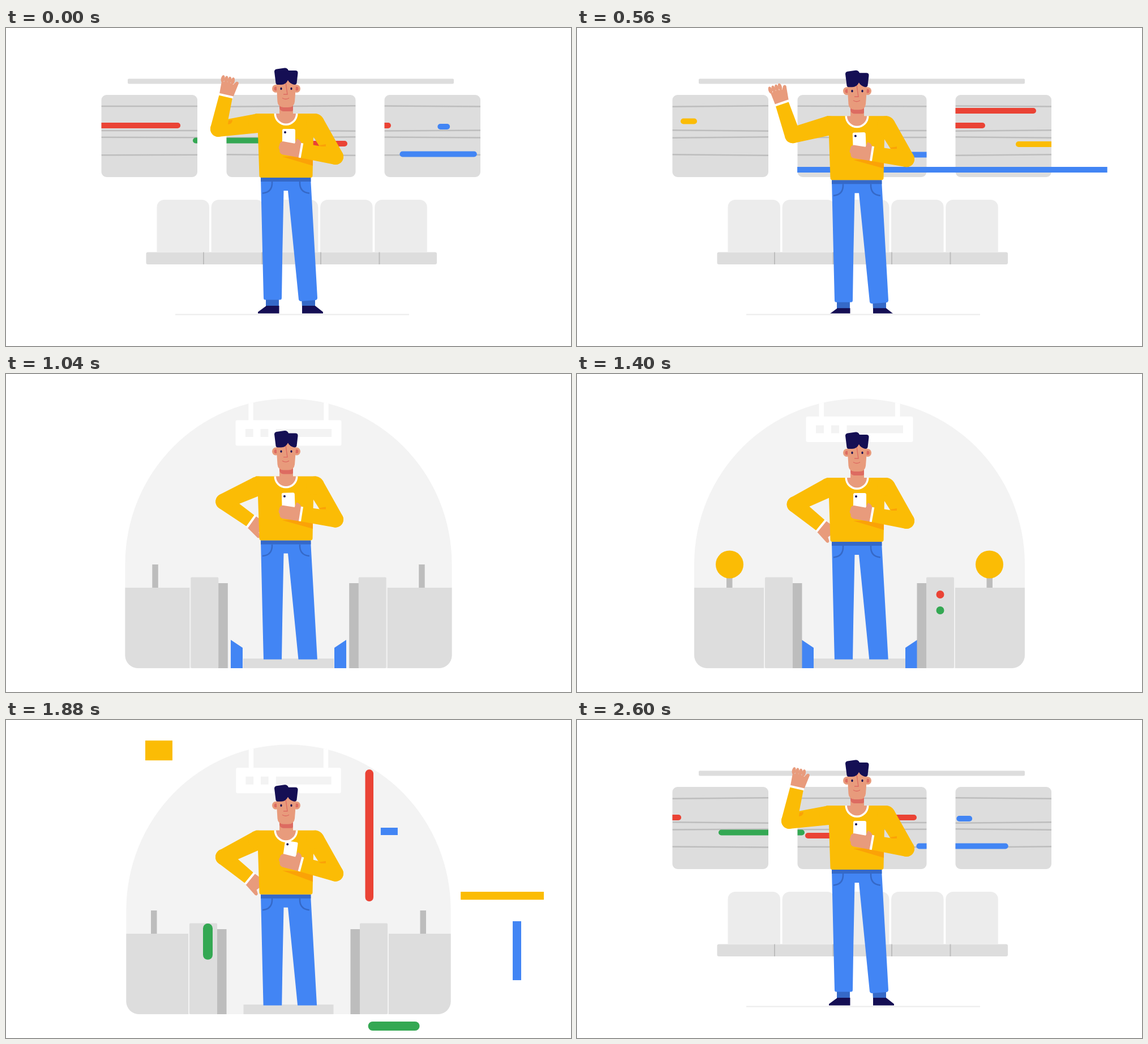
Animation of 998 by 561 pixels, one loop 2640 ms. Source, as an HTML page with a canvas:

```html
<!DOCTYPE html>
<html lang="en">
<head>
<meta charset="utf-8">
<title>Commuter</title>
<style>
html, body { margin: 0; width: 100%; height: 100%; overflow: hidden; background: #fff; }
canvas { display: block; }
</style>
</head>
<body>
<canvas id="stage" width="998" height="561"></canvas>
<script>
const ctx = document.getElementById('stage').getContext('2d');
const LOOP = 2640;
const C = {
  red: '#ea4335', green: '#34a853', blue: '#4285f4', yellow: '#fbbc05', orange: '#fba207',
  denim: '#3569c8', navy: '#150f54', skin: '#e89b7c', blush: '#dd6b61',
  grey: '#ddd', dark: '#bdbdbd', seat: '#ececec', pale: '#f3f3f3', white: '#fff'
};

const clamp = v => Math.max(0, Math.min(1, v));
const ramp = (t, a, b) => clamp((t - a) / (b - a));

// Smooth curve through keys [time, ...values]; flat at extremes.
function track(keys, t, i = 1) {
  const n = keys.length - 1;
  if (t <= keys[0][0]) return keys[0][i];
  if (t >= keys[n][0]) return keys[n][i];
  let k = 0;
  while (t >= keys[k + 1][0]) k++;
  const slope = j => (keys[j + 1][i] - keys[j][i]) / (keys[j + 1][0] - keys[j][0]);
  const tangent = j => j < 1 || j >= n || slope(j - 1) * slope(j) <= 0 ? 0
    : (keys[j + 1][i] - keys[j - 1][i]) / (keys[j + 1][0] - keys[j - 1][0]);
  const a = keys[k], b = keys[k + 1], d = b[0] - a[0], u = (t - a[0]) / d, v = 1 - u;
  return a[i] * v * v * (1 + 2 * u) + b[i] * u * u * (3 - 2 * u)
    + d * u * v * (v * tangent(k) - u * tangent(k + 1));
}

function rect(color, x, y, w, h, r = 0) {
  if (w <= 0 || h <= 0) return;
  ctx.fillStyle = color;
  ctx.beginPath();
  ctx.roundRect(x, y, w, h, r);
  ctx.fill();
}
function circle(color, x, y, r, ry = r) {
  ctx.fillStyle = color;
  ctx.beginPath();
  ctx.ellipse(x, y, Math.max(0, r), Math.max(0, ry), 0, 0, 7);
  ctx.fill();
}
function shape(color, path) {
  ctx.fillStyle = color;
  ctx.fill(new Path2D(path));
}
function line(color, width, path) {
  ctx.strokeStyle = color;
  ctx.lineWidth = width;
  ctx.stroke(new Path2D(path));
}
function scaleX(cx, k) {
  ctx.translate(cx, 0);
  ctx.scale(k, 1);
  ctx.translate(-cx, 0);
}
function layer(draw) {
  ctx.save();
  draw();
  ctx.restore();
}

// color, y, time, tail, head, tail speed, head speed
const streaks = [
  ['red', 172, 0, 150, 305, 2, 3.1], ['green', 198.5, 0, 328, 480, 2, 2],
  ['red', 204, 0, 481, 601, 2, 2], ['red', 172, 0, 620, 678, 2.2, 2],
  ['blue', 174, 0, 760, 782, 2.3, 2.15], ['blue', 222.5, 0, 693, 830, 2.4, 1.75],
  ['yellow', 164.5, 560, 180, 209], ['blue', 223.5, 560, 500, 630],
  ['red', 146, 560, 640, 808], ['red', 172, 560, 625, 718], ['yellow', 205, 560, 772, 900],
  ['green', 197.5, 800, 100, 304], ['yellow', 208, 800, 228, 640],
  ['red', 193.5, 800, 557, 796], ['blue', 193.5, 800, 243, 281],
  ['green', 146, 800, 660, 812], ['blue', 248.5, 800, 630, 718], ['blue', 223.5, 800, 782, 820],
  ['red', 185, 2160, 100, 391], ['green', 158, 2160, 416, 713], ['yellow', 137, 2160, 791, 880]
];

// color, time, x, y, w, h, drift x, drift y, rounded
const flyers = [
  ['yellow', 800, 604, 155, 10, 142, 0, 130, 1], ['yellow', 800, 384, 297, 10, 57, 0, 90, 1],
  ['green', 800, 174, 361, 10, 61, 0, -90, 1], ['red', 800, 727, 384, 195, 10, -90, 0, 1],
  ['yellow', 1880, 246, 38, 48, 35, 0, -180, 0], ['blue', 1880, 661, 190, 30, 13, 90, 0, 0],
  ['yellow', 1880, 802, 303, 147, 14, 110, 0, 0], ['blue', 1880, 895, 354, 15, 104, 0, 100, 0],
  ['red', 1880, 634.5, 89, 14.5, 233, 0, -180, 1], ['green', 1880, 348, 358, 17, 64, 0, 90, 1],
  ['green', 1880, 639, 532, 91, 16, 60, 0, 1]
];

function drawTrain(t) {
  const u = t < 1320 ? ramp(t, 700, 940) : 1 - ramp(t, 1940, 2140);
  if (u >= 1) return;
  const pole = t < 1320 ? 1 - ramp(t, 600, 760) : ramp(t, 2020, 2150);
  rect(C.grey, 503 - 288 * pole, 89.5, 576 * pole, 9, 2);

  layer(() => {
    scaleX(503, 1 - u ** 8);
    const shift = 250 * u ** 3.7;
    const windows = [[168.5 + shift, 169.5], [389.5, 228], [668.5 - shift, 169.5]];
    const panes = new Path2D();
    windows.forEach(([x, w]) => panes.roundRect(x, 118, w, 145, 9));
    ctx.fillStyle = C.grey;
    ctx.fill(panes);
    ctx.clip(panes);
    windows.forEach(([x, w], i) => [138, 181, 193, 224].forEach((y, j) => {
      const tilt = 0.8 * Math.sin(Math.floor(t / 80) * 2 + i * 2 + j * 3);
      line(C.dark, 2.5, `M${x} ${y + tilt}L${x + w} ${y - tilt}`);
    }));
    for (const [color, y, at, tail, head, vTail, vHead] of streaks) {
      const dt = (t - at + 1.5 * LOOP) % LOOP - LOOP / 2;
      const v = at === 800 ? 3.4 : 3;
      const a = tail + dt * (vTail || v), b = head + dt * (vHead || v);
      rect(C[color], a, y - 5, b - a, 10, 5);
    }
  });

  layer(() => {
    scaleX(505.5, 1 - u * u);
    for (let i = 0; i < 5; i++) rect(C.seat, 266.5 + 96.2 * i, 303, 92.5, 92, [13, 13, 0, 0]);
    rect(C.grey, 247.5, 395.5, 513.5, 21.5, 3);
    for (let i = 0; i < 4; i++) rect(C.dark, 348 + 103.5 * i, 395.5, 2, 21.5);
  });
}

const groundKeys = [[600, 206.5], [800, 107], [880, 0], [2040, 0], [2140, 206.5]];
const leftFlap = [[640, 300, 300, 400, 400], [800, 365, 401, 433, 457],
  [1040, 397, 418, 469, 483], [1720, 397, 418, 469, 483], [1840, 376, 397, 469, 483]];
const rightFlap = [[640, 971, 971, 459, 459], [800, 615, 848, 459, 459],
  [1040, 580, 601, 483, 469], [1720, 580, 601, 483, 469], [1840, 601, 622, 483, 469]];

function drawFlap(keys, t) {
  const [a, b, ya, yb] = [1, 2, 3, 4].map(i => track(keys, t, i));
  shape(C.blue, `M${a} ${ya}L${b} ${yb}V519H${a}Z`);
}

function drawGate(t) {
  const u = t < 1400 ? 1 - ramp(t, 880, 1120) : ramp(t, 1800, 2020);
  const k = 1 - u ** 4, slide = 160 * u ** 3;
  if (k > 0) layer(() => {
    scaleX(499, k);
    const arch = new Path2D();
    arch.roundRect(207, 43.5, 584, 475.5, [292, 292, 23, 23]);
    ctx.fillStyle = C.pale;
    ctx.fill(arch);
    ctx.clip(arch);
    const drop = slide * 1.15;
    rect(C.white, 427.5, 40, 8.5, 40 + drop);
    rect(C.white, 562, 40, 8.5, 40 + drop);
    rect(C.white, 404.5, 75 + drop, 189, 45, 3);
    [[422, 14], [449, 14], [476.5, 99.5]].forEach(([x, w]) => rect(C.pale, x, 90.5 + drop, w, 14));
  });
  if (t > 640 && t < 1860) {
    drawFlap(leftFlap, t);
    drawFlap(rightFlap, t);
  }
  if (k <= 0) return;
  layer(() => {
    ctx.beginPath();
    ctx.roundRect(499 - 292 * k, 43.5, 584 * k, 475.5, [292 * k, 292 * k, 23 * k, 23 * k]);
    ctx.clip();
    for (const side of [1, -1]) layer(() => {
      ctx.translate(499, 0);
      ctx.scale(side, 1);
      ctx.translate(slide, 0);
      rect(C.dark, 224.5, 336, 10.5, 42);
      rect(C.grey, 169, 377, 300, 142);
      rect(C.dark, 101.5, 369, 17, 150);
      rect(C.grey, 118, 358.5, 49, 160.5, 2);
    });
  });
  rect(C.grey, 499 - 81 * k, 502, 162 * k, 17);
  const pop = ramp(t, 1040, 1200) * (1 - ramp(t, 1740, 1800));
  circle(C.yellow, 269.5, 336, 24.5 * pop);
  circle(C.yellow, 728.5, 336, 24.5 * pop);
  circle(C.red, 641.5, 389, 7 * pop);
  circle(C.green, 641.5, 417, 7 * pop);
}

const beamKeys = [[480, 389, 389], [560, 389, 932], [600, 500, 971], [700, 971, 971]];

function drawFlyers(t) {
  const tail = track(beamKeys, t, 1);
  rect(C.blue, tail, 245, track(beamKeys, t, 2) - tail, 10);
  for (const [color, at, x, y, w, h, dx, dy, round] of flyers) {
    const u = (t - at) / 100, k = 1 - Math.abs(u) ** 1.5;
    if (!(k > 0)) continue;
    const fw = w > h ? w * k : w, fh = w > h ? h : h * k;
    rect(C[color], x + (w - fw) / 2 + dx * u, y + (h - fh) / 2 + dy * u, fw, fh, round ? 9 : 0);
  }
}

const sinkKeys = [[480, 0], [560, 4], [800, 78], [1160, 13], [1360, 32], [1800, 32],
  [1880, 43.5], [1990, 76], [2160, 35.5], [2360, 0]];
const armKeys = [[440, 375, 178, 13], [560, 381, 185, -18], [800, 378, 173, -229],
  [1100, 385, 198, -231], [1880, 384, 198, -231], [2160, 458, 227, -92], [2360, 375, 178, 13]];
const tiltKeys = [[500, 0], [800, -20], [1100, 0], [1800, 0], [1880, 8], [2160, -12], [2360, 0]];

// Tapered limb with a round joint at the start and a flat end.
function limb(x1, y1, r1, x2, y2, r2) {
  const a = Math.atan2(y2 - y1, x2 - x1), s = Math.sin(a), c = Math.cos(a);
  ctx.fillStyle = C.yellow;
  ctx.beginPath();
  ctx.arc(x1, y1, r1, a + Math.PI / 2, a + Math.PI * 1.5);
  ctx.lineTo(x2 + s * r2, y2 - c * r2);
  ctx.lineTo(x2 - s * r2, y2 + c * r2);
  ctx.fill();
}

function drawFreeArm(t) {
  const [ex, ey, deg] = [1, 2, 3].map(i => track(armKeys, t, i));
  const a = deg * Math.PI / 180;
  const wx = ex + 61 * Math.sin(a), wy = ey - 61 * Math.cos(a);
  layer(() => {
    ctx.translate(wx, wy);
    ctx.rotate(a);
    shape(C.skin, 'M-12 0L-13 -21Q-3 -25 8 -21L12 -27Q16 -29 17 -25L13 0Z');
    const grip = clamp((deg + 90) / 60);
    if (grip) for (let i = 0; i < 4; i++) circle(C.skin, -12 + i * 6, -21 - 6 * grip, 3.3, 6.5 * grip);
    rect(C.white, -13, -1, 26, 4);
  });
  limb(ex, ey, 14, wx - 3 * Math.sin(a), wy + 3 * Math.cos(a), 12);
  limb(ex, ey, 14, 445, 168, 17);
  circle(C.yellow, 445, 168, 17);
  if (t < 480 || t > 2320) shape(C.orange, 'M393 163L400 162Q400 169 392 170Z');
}

function drawLegs(bend) {
  const knee = -8 * bend;
  shape(C.denim, 'M459 476H482V492H459ZM522 476H546V492H523Z');
  shape(C.navy, 'M445 504V501L460 490H482.5V504ZM560 504V501L546 490H523V504Z');
  shape(C.blue, `M450 264L${453 + knee} 394L455 476Q455 479.5 458 479.5H484Q487 479.5 487 476
    L${488.3 + knee} 394L490.5 287H498L517 479Q518 482 521 482L547 480Q550 479 550 476L538 264Z`);
  rect(C.denim, 450, 264, 88.5, 7);
  line(C.denim, 2.5, 'M470 271Q471 290 453 291.5M519 271Q518 290 536 291.5');
}

function drawTorso() {
  shape(C.yellow, 'M441 151H548L543 190L541.5 261Q541 264 538 264H451Q448 264 447.5 261L445 186Z');
  ctx.fillStyle = C.white;
  ctx.beginPath();
  ctx.arc(494.5, 151, 21, 0, Math.PI);
  ctx.fill();
  ctx.fillStyle = C.skin;
  ctx.beginPath();
  ctx.arc(494.5, 151, 17.5, 0, Math.PI);
  ctx.fill();
  rect(C.skin, 483, 130, 24, 25);
  rect(C.blush, 483, 130, 24, 17, [0, 0, 3, 7]);
}

function drawPhoneArm(tilt) {
  const ex = 582, ey = 227, wx = 521, wy = 216 - 0.65 * tilt;
  shape(C.orange, `M488 ${wy + 11}L542 ${243 - tilt * 0.2}V225Z`);
  limb(ex, ey, 14, 546, 167, 16);
  circle(C.yellow, 546, 167, 16);
  limb(ex, ey, 14, wx, wy, 13);
  shape(C.orange, 'M552 207L565 205V209H556Z');
  layer(() => {
    ctx.translate(499.5 + 0.4 * tilt, 191 - 0.95 * tilt);
    ctx.rotate(tilt * Math.PI / 180);
    rect(C.white, -11.5, -13, 23, 34, 3);
    circle(C.navy, -6.5, -7, 2);
  });
  layer(() => {
    ctx.translate(wx, wy);
    ctx.rotate(Math.atan2(ey - wy, ex - wx));
    shape(C.skin, 'M-1 13H-31Q-37 12 -37 6Q-41 3 -39 -2Q-40 -8 -34 -10H-13L-11 -19Q-5 -19 -1 -12Z');
    rect(C.white, -2, -13, 4, 26);
  });
}

function drawHead(t) {
  const surprised = (t > 680 && t < 1000) || (t > 2040 && t < 2260);
  const squint = clamp(1 - Math.abs(t - 800) / 80);
  for (const side of [-1, 1]) {
    circle(C.skin, 495 + side * 18.5, 107, 6.5, 7);
    circle(C.blush, 495 + side * 18.5, 107, 3, 3.5);
  }
  shape(C.skin, 'M477 90H513L510 130Q509 140 498 140H490Q480 139 479.5 130Z');
  for (const x of [486, 504]) circle(C.navy, x, 107, 1.6, 2.2 - 1.4 * squint);
  line(C.blush, 1.4, 'M494 96L497 117H490');
  if (surprised) circle(C.white, 494.5, 126, 2.5);
  else line(C.blush, 1.4, 'M488 123.5Q494 127.5 500 123.5');
  shape(C.navy, `M474 77Q474 73 478 72.5L492 70.5Q497 70 499 75H511Q516 75 515.5 80L513.5 97
    Q513 100 509 100Q501 98 498 92Q494 100 486 100H480Q477 100 476.5 97Z`);
}

function drawMan(t) {
  const sink = track(sinkKeys, t);
  layer(() => {
    ctx.beginPath();
    ctx.rect(0, 0, 998, 503.5);
    ctx.clip();
    ctx.translate(0, sink);
    drawFreeArm(t);
    drawLegs(clamp((sink - 45) / 33));
    drawTorso();
    drawPhoneArm(track(tiltKeys, t));
    drawHead(t);
  });
}

function frame(now) {
  const t = now % LOOP;
  rect(C.white, 0, 0, 998, 561);
  drawTrain(t);
  const ground = track(groundKeys, t);
  rect(C.seat, 505.5 - ground, 504.5, 2 * ground, 2);
  drawGate(t);
  drawFlyers(t);
  drawMan(t);
  requestAnimationFrame(frame);
}
requestAnimationFrame(frame);
</script>
</body>
</html>
```
